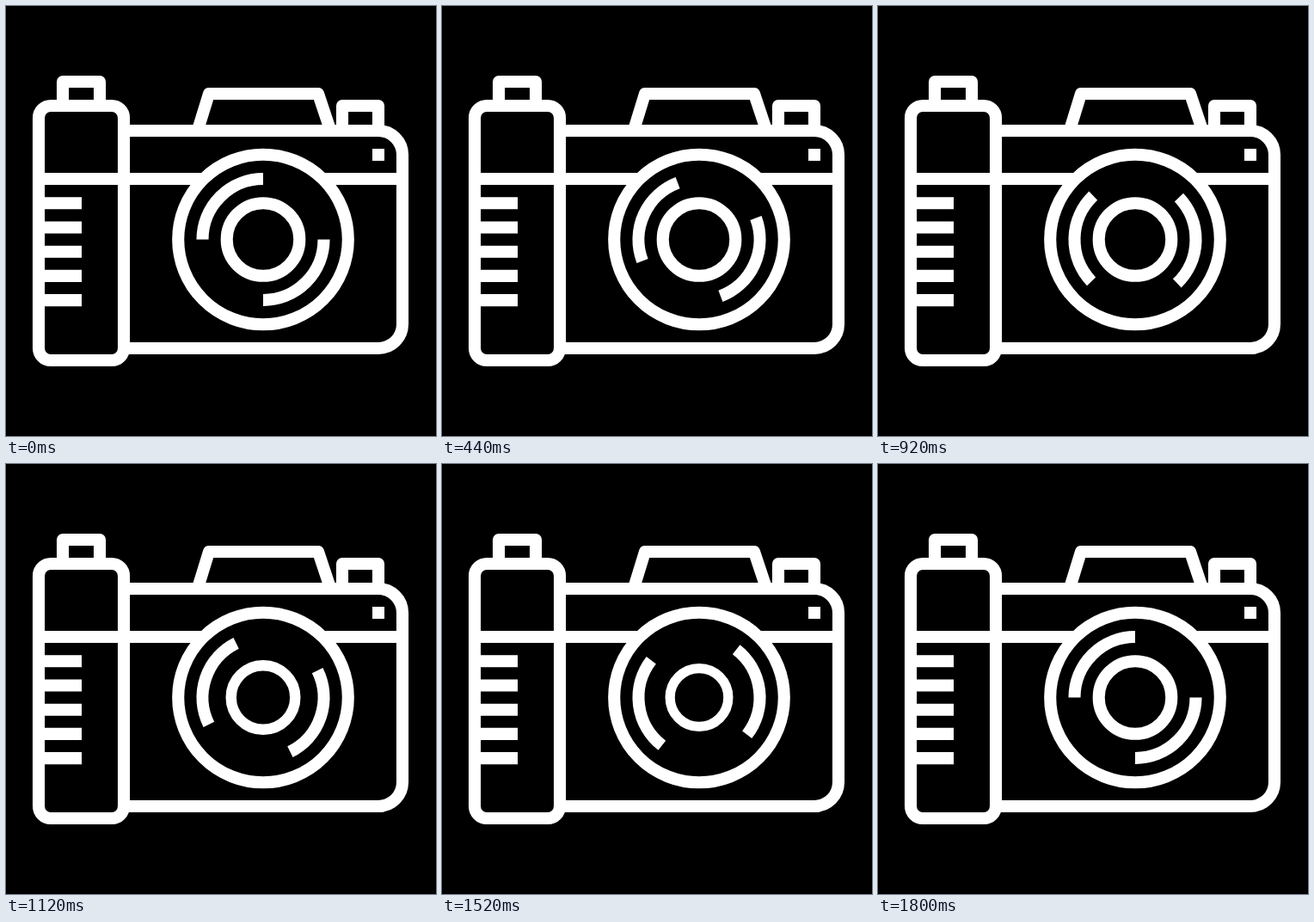
An HTML page for the animation above (3000 ms loop, 500 by 500 pixels).

```html
<!DOCTYPE html>
<html lang="en">
<head>
<meta charset="utf-8">
<title>Camera</title>
<style>
  html, body { margin: 0; width: 100%; height: 100%; overflow: hidden; background: #000; }
  svg { display: block; width: 100%; height: 100%; }
  .line { fill: none; stroke: #fff; stroke-width: 14.1; }
  .round { stroke-linejoin: round; }
</style>
</head>
<body>
<svg viewBox="0 0 500 500">
  <g class="line round">
    <path d="M66 116V88H109V116"/>
    <path d="M224 141L236 102H363L376 141"/>
    <path d="M391 145V116H433V145"/>
    <path d="M137 145H433A28 28 0 0 1 461 173V370A28 28 0 0 1 433 398H137"/>
    <rect x="38" y="116" width="99" height="296" rx="14"/>
  </g>
  <path class="line" d="M38 201H461"/>
  <path class="line" d="M38 229.3H88M38 257.5H88M38 285.7H88M38 313.9H88M38 342.1H88"/>
  <rect x="426" y="166" width="14" height="14" fill="#fff"/>
  <g transform="translate(299 271.5)">
    <circle class="line" r="98.8" style="fill:#000"/>
    <path id="arcs" class="line" d="M-70.5 0A70.5 70.5 0 0 1 0 -70.5M70.5 0A70.5 70.5 0 0 1 0 70.5"/>
    <circle id="ring" class="line" r="42.3"/>
  </g>
</svg>
<script>
  const LOOP = 3000, STEP = 40;

  // [time in ms, value, slope per ms]
  const turn = [
    [320, 0, -0.1275],
    [730, -63, 0],
    [1100, -26, 0],
    [1420, -63, 0],
    [1800, 0, 0]
  ];
  const zoom = [
    [940, 1, 0],
    [1260, 0.8, 0],
    [1520, 0.8, 0],
    [1800, 1, 0]
  ];

  // Cubic Hermite curve through the keys, held at both ends
  function sample(keys, t) {
    const last = keys[keys.length - 1];
    if (t <= keys[0][0]) return keys[0][1];
    if (t >= last[0]) return last[1];
    const i = keys.findIndex(k => k[0] > t);
    const [t0, a, sa] = keys[i - 1];
    const [t1, b, sb] = keys[i];
    const d = t1 - t0, u = (t - t0) / d, v = 1 - u;
    return a + (b - a) * u * u * (3 - 2 * u) + d * u * v * (sa * v - sb * u);
  }

  const arcs = document.getElementById('arcs');
  const ring = document.getElementById('ring');
  const start = performance.now();

  function draw(now) {
    const time = Math.max(0, now - start) % LOOP;
    const t = Math.floor(time / STEP) * STEP;
    arcs.setAttribute('transform', `rotate(${sample(turn, t)})`);
    ring.setAttribute('transform', `scale(${sample(zoom, t)})`);
  }

  function tick() {
    draw(performance.now());
    requestAnimationFrame(tick);
  }
  tick();
</script>
</body>
</html>
```
